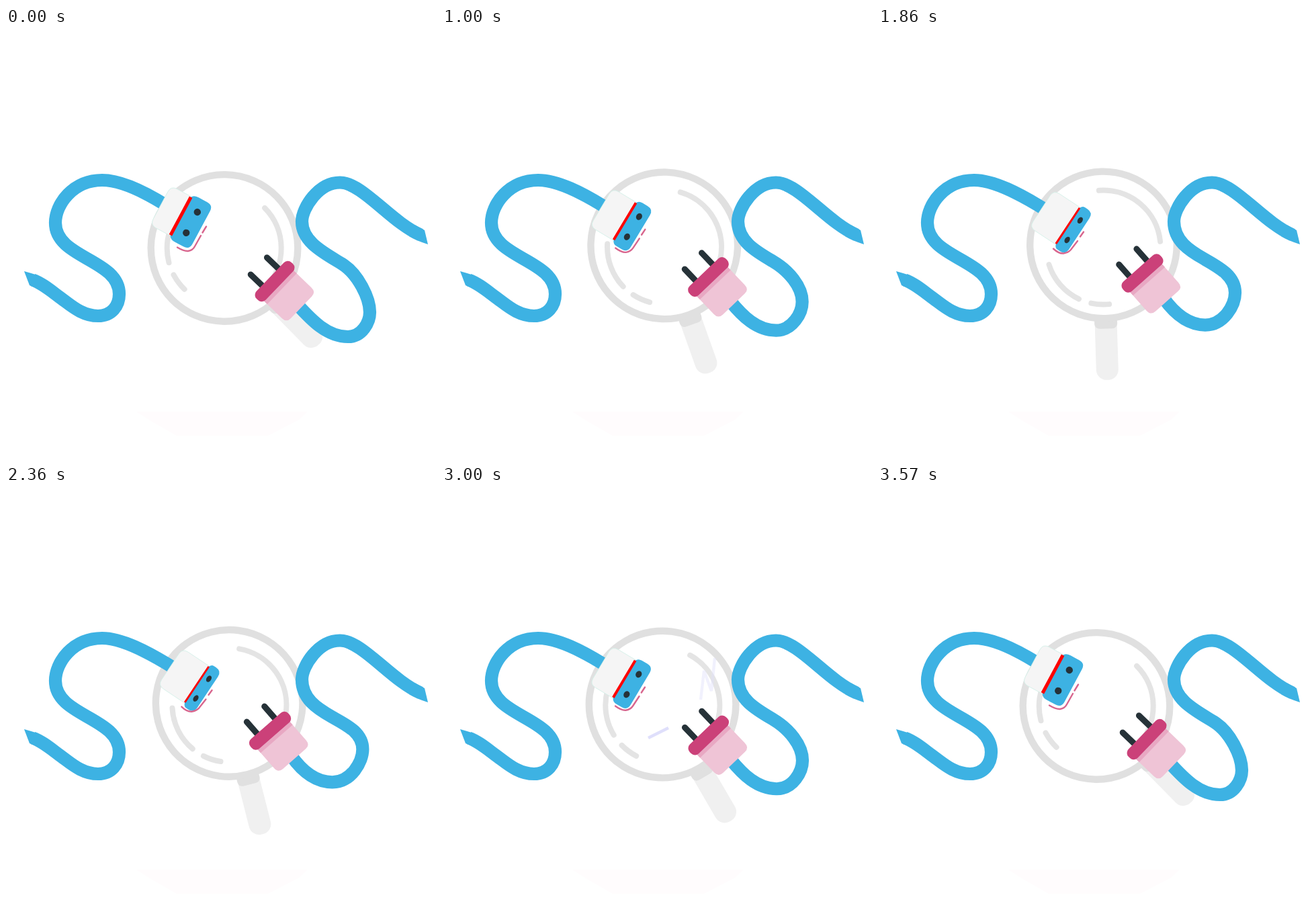
Write an HTML page that moves like this. It is 640 px wide and 640 px high and loops after 3.64 s.

```html
<!DOCTYPE html>
<html lang="en">
<head>
<meta charset="utf-8">
<title>Unplugged</title>
<style>
html, body { margin: 0; width: 100%; height: 100%; overflow: hidden; background: #fff; }
svg { display: block; width: 100vw; height: 100vh; }
.cable { fill: none; stroke: #3db2e3; stroke-width: 19.2; }
.tip { fill: #3db2e3; }
.arc { fill: none; stroke: #e4e4e4; stroke-width: 8; stroke-linecap: round; }
.sketch { fill: none; stroke: #d8668e; stroke-width: 2.4; stroke-linecap: round; }
.spark { fill: none; stroke: #dfdffb; stroke-width: 4.4; }
.pin { stroke: #263238; stroke-width: 9; stroke-linecap: round; }
.dark { fill: #263238; }
</style>
</head>
<body>
<svg viewBox="0 0 640 640">
  <path fill="#fffcfd" d="M194 571H449L436 583L390 607H254L214 584Z"/>

  <g id="lens">
    <path fill="#f0f0f0" d="M-16.5 94H16.5V170A15.3 15.3 0 0 1 1.2 185.3H-1.2A15.3 15.3 0 0 1 -16.5 170Z"/>
    <path fill="#e0e0e0" d="M-17 94H17V102Q16 109 9 109H-9Q-16 109 -17 102Z"/>
    <circle cy="-15.7" r="109.3" fill="#fff" stroke="#e0e0e0" stroke-width="10.4"/>
  </g>
  <g id="shine"></g>

  <path class="spark" id="sparkA" d="M320 321L349 341"/>
  <g id="sparkB">
    <path class="spark" d="M307 375L337 360"/>
    <path class="spark" stroke-opacity=".45" d="M385 318L390 275L401 305L406 256"/>
  </g>

  <path class="tip" d="M27 362Q38 365 47 368L46 388L35 383Z"/>
  <path class="cable" id="cableL"/>
  <path class="tip" d="M623 301L628 322Q612 317 600 310L608.5 293Z"/>
  <path class="cable" id="cableR"/>

  <g id="socket">
    <path id="shell" fill="#f5f5f5" stroke="#d3f0e8" stroke-width=".8"/>
    <path id="face" fill="#3db2e3"/>
    <ellipse id="holeA" class="dark" cy="-17" ry="5.2"/>
    <ellipse id="holeB" class="dark" cy="18" ry="5.2"/>
    <path id="seam" stroke="#f00" d="M0 -32V32"/>
  </g>
  <path class="sketch" id="sketch"/>

  <g id="plug">
    <path class="pin" d="M-32.8 -17.5H-5M-32.8 17.5H-5"/>
    <path fill="#efc4d6" d="M5 -31H46Q55.3 -31 55.3 -22V23Q55.3 32.3 46 32.3H5Z"/>
    <rect x="5" y="-31" width="10.5" height="63.3" fill="#e8a8c3"/>
    <rect x="-9.5" y="-37.5" width="19" height="75" rx="8" fill="#cb4179"/>
  </g>
</svg>
<script>
const LOOP = 3640, FRAMES = 51, LENS_TURN = 44.5, PLUG_PEAK = 31 / 50;
const $ = id => document.getElementById(id);
const set = (id, attr, val) => $(id).setAttribute(attr, val);
const mix = (a, b, k) => a + (b - a) * k;

// Blends two paths that share the same commands.
function morph(a, b, k) {
  const nums = b.match(/-?[\d.]+/g);
  let i = 0;
  return a.replace(/-?[\d.]+/g, n => mix(+n, +nums[i++], k).toFixed(2));
}

function place(id, x, y, angle) {
  set(id, "transform", `translate(${x} ${y}) rotate(${angle})`);
}

// Arc of the inner reflection, angles clockwise from the top.
function arc(from, to) {
  const at = deg => {
    const a = deg * Math.PI / 180;
    return `${85 * Math.sin(a)} ${-85 * Math.cos(a)}`;
  };
  return `<path class="arc" d="M${at(from)}A85 85 0 0 1 ${at(to)}"/>`;
}
$("shine").innerHTML = arc(0, 88.6) + arc(178.7, 196.9) + arc(210, 257);

const COIL = "M40 375C54 380 68 392 83 403S114 428.5 137 428.5C157 428.5 168.5 414 168.5 396C168.5 344 73.5 343 73.5 290C73.5 262 100 226.5 143 226.5";
const LEFT = [
  COIL + "C172 226.5 206 243.5 240 265",
  COIL + "C172 226.5 210 246 250 271"
];
const ARCH = "M617 308C573 289 530 230 497 230C465 230 440.5 268 440.5 288";
const RIGHT = [
  ARCH + "C440.5 318 472 334 500 351C524 366 541.5 402 541.5 423C541.5 438 530 459.5 509 459.5C478 459.5 455 435 434 412",
  ARCH + "C440.5 316.5 463 331 486 344C509 357 531.5 369.5 531.5 394C531.5 412 515 442 487 442C460 442 440 423 425 402"
];
const SKETCH = [
  "M255 326.5Q265 332.5 271 332Q278 331 281 325L290 309M292.5 304.5L298 295.5",
  "M261 328.5Q269 336 276 335.5Q283 334.5 287 330L297 317M301 310.5L306 303.5"
];

const flash = (t, mid) => Math.max(0, 1 - Math.abs(t - mid) / 140);

function drawSocket(pull) {
  place("socket", 260 + 22.5 * pull, 280 + 14.5 * pull, 28.2 + 5.2 * pull);
  const back = -34 - 12.7 * pull, w = 35 - 14.3 * pull, s = w * 0.3;
  set("shell", "d", `M0 -33H${back + 10}Q${back} -33 ${back} -23V23Q${back} 33 ${back + 10} 33H0Z`);
  set("face", "d", `M0 -32Q2 -37 ${s} -37H${w - 10}Q${w} -37 ${w} -27V28Q${w} 38 ${w - 10} 38H${s}Q2 38 0 32Z`);
  for (const id of ["holeA", "holeB"]) {
    set(id, "cx", 19 - 8.2 * pull);
    set(id, "rx", 5.2 - 1.6 * pull);
  }
  set("seam", "stroke-width", 5 - 2 * pull);
}

function draw(ms) {
  const t = ms % LOOP;
  const p = Math.floor(t / LOOP * FRAMES + 0.05) / (FRAMES - 1) % 1;
  const turn = 1 - Math.abs(2 * p - 1);
  const pull = 1.19 * Math.min(p / PLUG_PEAK, (1 - p) / (1 - PLUG_PEAK));

  place("lens", 336, 338.6, -LENS_TURN * (1 - turn));
  place("shine", mix(324.7, 336, turn), 327.7 - 5.5 * turn + 4.5 * turn * turn, 45.3 - 51.9 * turn);

  set("cableL", "d", morph(...LEFT, pull));
  set("cableR", "d", morph(...RIGHT, pull));
  set("sketch", "d", morph(...SKETCH, pull));
  drawSocket(pull);
  place("plug", 400 - 6.5 * pull, 377 - 12 * pull, 43.8 + 4.7 * pull);

  set("sparkA", "opacity", flash(t, 430));
  set("sparkB", "opacity", flash(t, 3000));
}

const start = performance.now();
function tick() {
  draw(performance.now() - start);
  requestAnimationFrame(tick);
}
tick();
</script>
</body>
</html>
```
